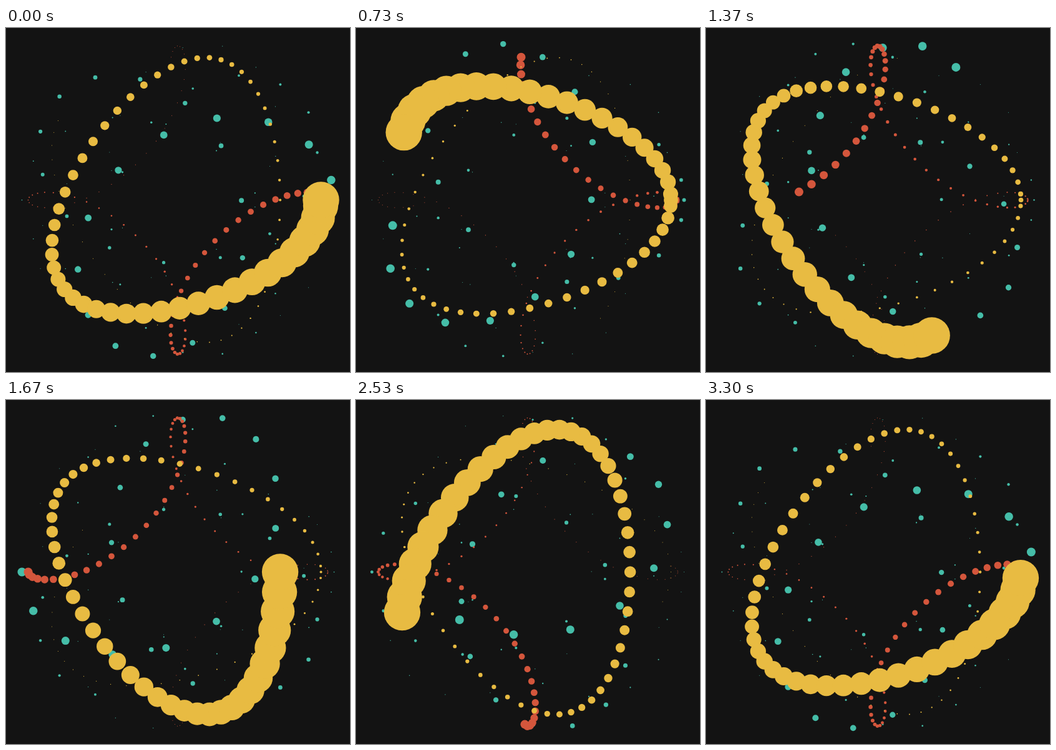
An HTML page with a canvas for the animation above (3.33 s loop, 551 px wide and 551 px high).

```html
<!DOCTYPE html>
<html lang="en">
<head>
<meta charset="utf-8">
<title>Trailing dots</title>
<style>
  html, body { margin: 0; width: 100%; height: 100%; overflow: hidden; background: #131313; }
  canvas { display: block; }
</style>
</head>
<body>
<canvas id="stage" width="551" height="551"></canvas>
<script>
const ctx = document.getElementById('stage').getContext('2d');
const SIZE = 551, MID = SIZE / 2, STRETCH = 36 / 35;
const LOOP = 3330, STEPS = 100, TRAIL = 80;

// Each path is the sum of two rotating arms: [length, turns per loop].
const paths = [
  { color: '#45bda8', head: 7,    arms: [[174.2, 7], [75.8, -3]] },
  { color: '#d4563c', head: 7,    arms: [[163.4, -1], [76.6, 3]] },
  { color: '#e8bb42', head: 29.2, arms: [[196.3, -2], [32.7, 3]] }
];

// Step 0 sits on the axis; the others lie half a step off it.
const angle = step => step ? (step - 0.5) * 2 * Math.PI / (STEPS - 1) : 0;

function place(arms, a) {
  let x = 0, y = 0;
  for (const [len, turns] of arms) {
    x += len * Math.cos(turns * a);
    y += len * Math.sin(turns * a);
  }
  return [MID + x, MID + y * STRETCH];
}

for (const p of paths) {
  p.dots = Array.from({ length: STEPS }, (_, i) => place(p.arms, angle(i)));
}

function draw(step) {
  ctx.fillStyle = '#131313';
  ctx.fillRect(0, 0, SIZE, SIZE);
  for (const { color, head, dots } of paths) {
    ctx.fillStyle = color;
    for (let age = TRAIL - 1; age >= 0; age--) {
      const [x, y] = dots[(step - age + STEPS) % STEPS];
      const r = 0.5 + (head - 0.5) * (1 - age / TRAIL) ** 3;
      ctx.beginPath();
      ctx.arc(x, y, r, 0, 2 * Math.PI);
      ctx.fill();
    }
  }
}

// Thirty steps a second, with each change rounded to 10 ms.
function stepAt(ms) {
  const tick = Math.floor((ms % LOOP) / 10) * 10;
  return Math.floor((tick + 4.9) * 0.03);
}

const start = performance.now();
let shown = -1;

function run() {
  const step = stepAt(performance.now() - start);
  if (step !== shown) draw(shown = step);
  requestAnimationFrame(run);
}
run();
</script>
</body>
</html>
```
